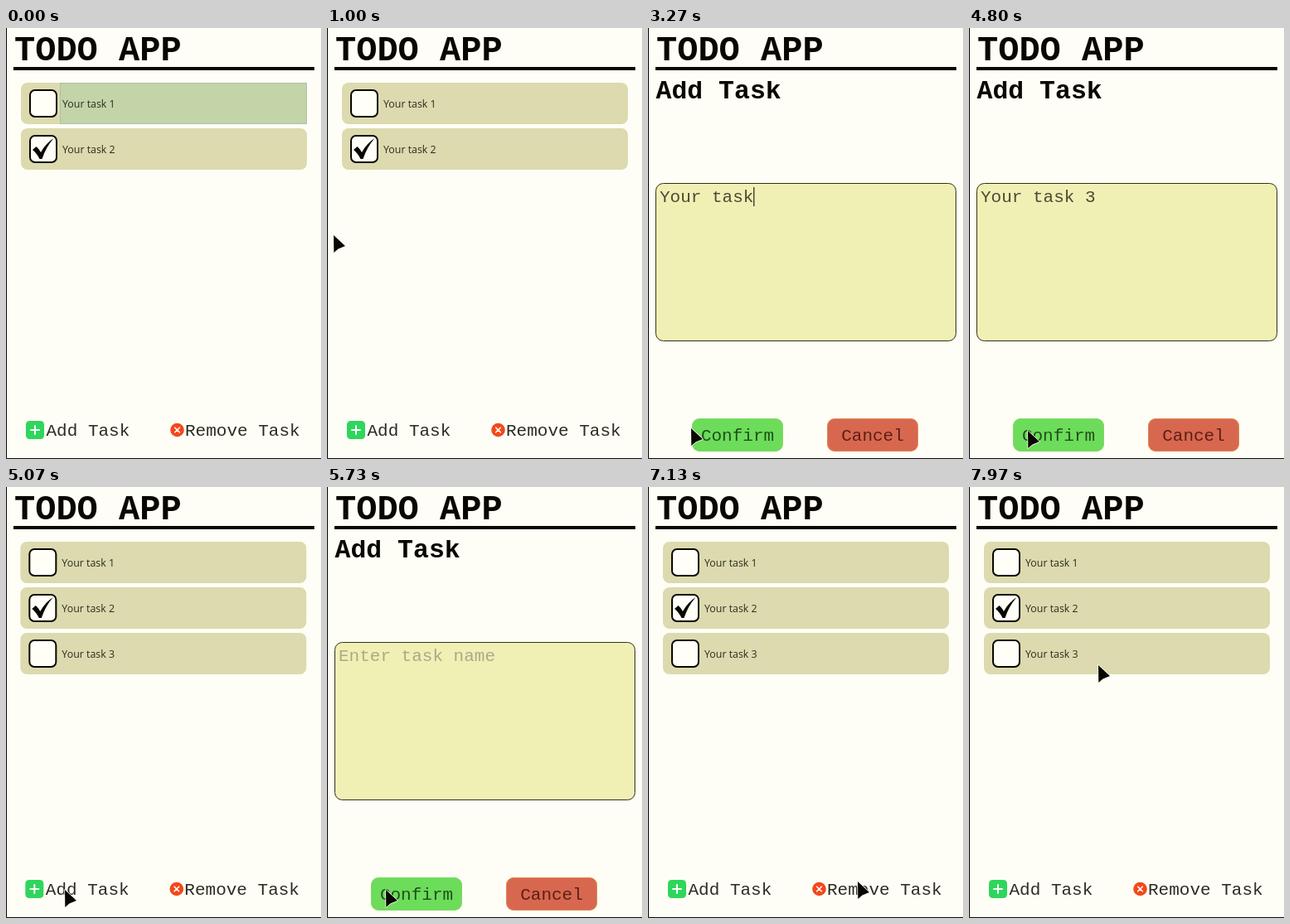
Write an HTML page that moves like this. It is 380 px wide and 520 px high and loops after 8 s.

```html
<!DOCTYPE html>
<html lang="en">
<head>
<meta charset="utf-8">
<title>Todo app</title>
<style>
  html, body { margin: 0; width: 100%; height: 100%; overflow: hidden; background: #fefef6; }
  svg { display: block; width: 380px; height: 520px; }
  text { font: 21px "Liberation Mono", monospace; fill: #2c2c22; white-space: pre; }
  .h1 { font-size: 42px; font-weight: 700; fill: #080800; }
  .h2 { font-size: 31.5px; font-weight: 700; fill: #080800; }
  .label { font: 500 12.4px "Open Sans", "Noto Sans", sans-serif; fill: #2c2c20; }
  .row { fill: #dcdaae; }
  .box { fill: #fffff8; stroke: #080800; stroke-width: 2; }
  .icon { fill: none; stroke: #fff; stroke-linecap: round; }
</style>
</head>
<body>
<svg viewBox="0 0 380 520">
  <defs>
    <clipPath id="stack"><rect x="8" y="64" width="365" height="449"/></clipPath>
    <g id="task">
      <rect class="row" x="18" y="66" width="345" height="50" rx="8"/>
      <rect class="box" x="29" y="75" width="32" height="32" rx="6"/>
    </g>
  </defs>

  <rect width="380" height="520" fill="#fefef6"/>
  <text class="h1" x="10" y="39">TODO APP</text>
  <rect x="9" y="47" width="363" height="4" fill="#080800"/>

  <g clip-path="url(#stack)">
    <g id="list">
      <g>
        <use href="#task"/>
        <rect id="glow" x="65.5" y="66.5" width="297" height="49" fill="#c2d4a8" stroke="#a9c2a4"/>
        <text class="label" x="68" y="95.5">Your task 1</text>
      </g>
      <g transform="translate(0 55)">
        <use href="#task"/>
        <path d="M32 92L36.5 88Q40 91 42 95Q48 84 57.5 78Q48 89 43.5 103H40.5Q37 96 32 92Z" fill="#080800"/>
        <text class="label" x="68" y="95.5">Your task 2</text>
      </g>
      <g id="third" transform="translate(0 110)">
        <use href="#task"/>
        <text class="label" x="68" y="95.5">Your task 3</text>
      </g>
      <rect x="24" y="474" width="22" height="22" rx="4.5" fill="#2fd65c"/>
      <path class="icon" stroke-width="2" d="M30 485h10M35 480v10"/>
      <text x="48.5" y="492">Add Task</text>
      <circle cx="206.5" cy="485" r="8.3" fill="#f2481c"/>
      <path class="icon" stroke-width="1.6" d="M203.7 482.2l5.6 5.6m0-5.6l-5.6 5.6"/>
      <text x="216" y="492">Remove Task</text>
    </g>

    <g id="form">
      <text class="h2" x="9.5" y="85">Add Task</text>
      <rect x="9.5" y="187.5" width="362" height="190" rx="9" fill="#f1f0b4" stroke="#30301c"/>
      <text id="field" x="14" y="210"></text>
      <rect id="caret" y="192" width="1.2" height="23" fill="#222218"/>
      <rect x="53.5" y="471.5" width="109" height="39" rx="8.5" fill="#6cdc5a" stroke="#82d862"/>
      <text x="108" y="497.5" text-anchor="middle" style="fill:#1f4f1a">Confirm</text>
      <rect x="216.5" y="471.5" width="109" height="39" rx="8.5" fill="#d86750" stroke="#dc8a4c"/>
      <text x="271" y="497.5" text-anchor="middle" style="fill:#5c2013">Cancel</text>
    </g>
  </g>

  <path d="M.5 0V519.5H380" fill="none" stroke="#080800"/>
  <path id="cursor" d="M0 0L.3 21L5.5 16.5L14 13Z" fill="#080800" stroke="#fffff4"
        stroke-width="1.5" stroke-linejoin="round" paint-order="stroke"/>
</svg>

<script>
const LOOP = 8000, CHAR = 12.6, WIDTH = 365, SLIDE = 400;
const NOTE = "Your task 3";
const keyTimes = [2370, 2570, 2660, 2740, 2830, 2970, 3090, 3180, 3270, 3630, 3870];
const caretOn = [[1270, 1830], [2370, 4230]];

// Pages alternate open, close. The form stays put from the click until the first slide frame.
const slides = [
  { click: 1270, first: 1330, open: true },
  { click: 4720, first: 4930, open: false },
  { click: 5730, first: 5770, open: true },
  { click: 6730, first: 6730, open: false }
];
const [, confirmed, reopened] = slides;

// time, x, y of the pointer tip
const route = [
  [0, 1, 519], [30, 1, 519], [350, 60, 200], [650, 50, 13], [830, 30, 32],
  [1000, 8, 250], [1180, 50, 491], [1270, 52, 483],
  [4500, 52, 483], [4800, 71, 486],
  [6080, 71, 486], [6600, 263, 487],
  [6730, 263, 487], [7130, 253, 476],
  [7330, 253, 476], [7750, 121, 236], [7940, 156, 215]
];

const $ = id => document.getElementById(id);
const [list, form, glow, third, field, caret, cursor] =
  ["list", "form", "glow", "third", "field", "caret", "cursor"].map($);

const outCubic = v => 1 - (1 - Math.min(1, v)) ** 3;
const smooth = v => v * v * (3 - 2 * v);
const move = (el, x, y = 0) => el.setAttribute("transform", `translate(${x} ${y})`);
const show = (el, on) => el.setAttribute("visibility", on ? "inherit" : "hidden");

function pointerAt(t) {
  const i = route.findIndex(p => p[0] > t);
  if (i < 0) return route[route.length - 1].slice(1);
  const [t0, x0, y0] = route[i - 1], [t1, x1, y1] = route[i];
  const k = smooth((t - t0) / (t1 - t0));
  return [x0 + (x1 - x0) * k, y0 + (y1 - y0) * k];
}

// 0 = list in view, 1 = form in view
function pageAt(t) {
  const s = slides.filter(s => s.click <= t).pop();
  if (!s) return 0;
  if (t < s.first) return 1;
  const k = outCubic((t - s.click) / SLIDE);
  return s.open ? k : 1 - k;
}

function draw(t) {
  const page = pageAt(t);
  move(list, -WIDTH * page);
  move(form, WIDTH * (1 - page));
  list.style.display = page < 1 ? "" : "none";
  form.style.display = page > 0 ? "" : "none";

  const typed = t < reopened.click ? keyTimes.filter(k => k <= t).length : 0;
  field.textContent = typed ? NOTE.slice(0, typed) : "Enter task name";
  field.style.fill = typed ? "#4a4a36" : "#aaa98c";
  caret.setAttribute("x", 13.8 + typed * CHAR);
  show(caret, caretOn.some(([a, b]) => t >= a && t < b));

  show(glow, t < 30);
  show(third, t >= confirmed.click);
  show(cursor, t >= 30);
  move(cursor, ...pointerAt(t));
}

const start = performance.now();
function tick() {
  draw((performance.now() - start) % LOOP);
  requestAnimationFrame(tick);
}
tick();
</script>
</body>
</html>
```
